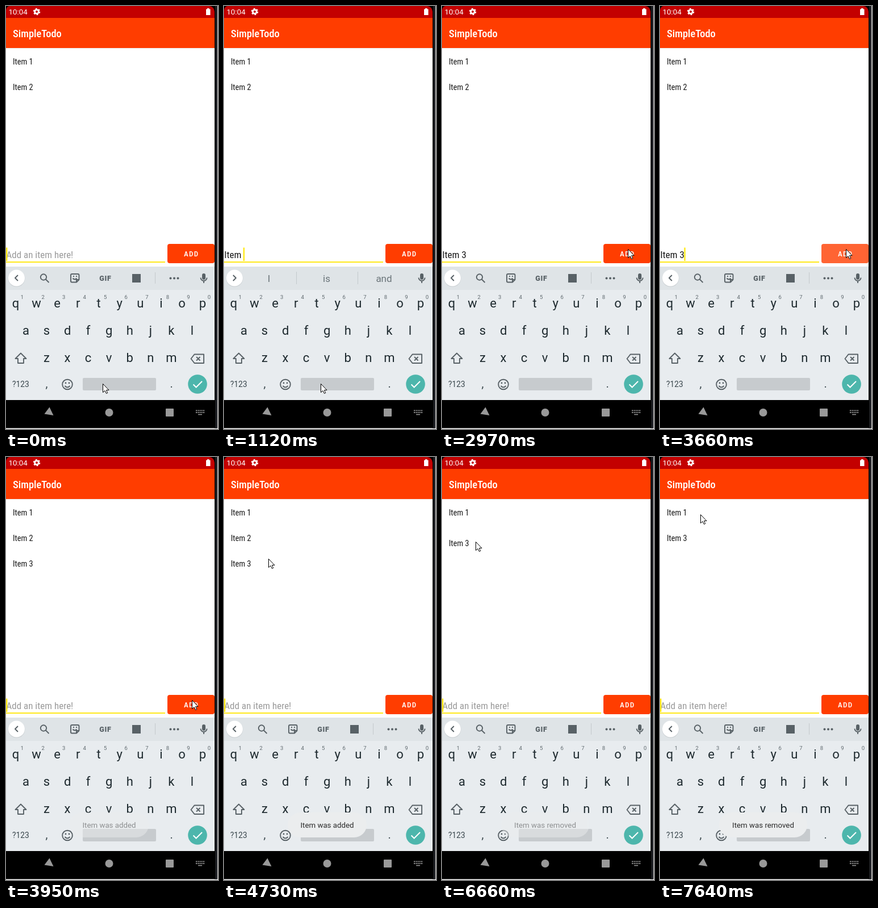
These frames come from a looping animation (373x745 px, 8 s). An HTML page:

```html
<!DOCTYPE html>
<html lang="en">
<head>
<meta charset="utf-8">
<title>Todo list demo</title>
<style>
html, body { margin: 0; width: 100%; height: 100%; overflow: hidden; background: #fff; }
svg { display: block; width: 100vw; height: 100vh; font-family: Roboto, sans-serif; }
.app { font-family: "Roboto Condensed", Roboto, sans-serif; font-stretch: condensed; }
.mid { text-anchor: middle; }
.line { fill: none; stroke: #586166; stroke-width: 1.9; stroke-linejoin: round; }
</style>
</head>
<body>
<svg viewBox="0 0 373 745">
  <rect width="373" height="745" fill="#fff"/>

  <!-- app -->
  <rect width="367" height="22" fill="#c30000"/>
  <rect y="21" width="367" height="53" fill="#ff3d00"/>
  <path d="M0 74.5H367" stroke="#ececec"/>
  <g fill="#fff">
    <text x="4.5" y="15" font-size="13.3">10:04</text>
    <circle cx="54" cy="10" r="3.4" fill="none" stroke="#fff" stroke-width="2.8"/>
    <circle cx="54" cy="10" r="5.3" fill="none" stroke="#fff" stroke-width="1.9" stroke-dasharray="2.8 2.75"/>
    <path d="M352 5.5h2V4h3.500v1.500h2V16h-7.500z"/>
    <text class="app" x="12" y="55" font-size="18.400" font-weight="500">SimpleTodo</text>
  </g>
  <g class="app" font-size="14.300" fill="#161616">
    <text x="12" y="102.500">Item 1</text>
    <text x="12" y="147.500" id="item2">Item 2</text>
    <text x="12" id="item3">Item 3</text>
  </g>
  <text class="app" id="field" x="0.500" y="443.500" font-size="17"/>
  <rect id="caret" y="425.500" width="2.500" height="23.500" fill="#ffeb1e"/>
  <rect y="450" width="280" height="2" fill="#ffe91a"/>
  <rect x="284" y="419" width="83" height="34" rx="4" fill="#ff3d00"/>
  <rect id="press" x="284" y="419" width="83" height="34" rx="4" fill="#fff"/>
  <text class="app" x="313" y="441" font-size="13" font-weight="500" letter-spacing="1.400" fill="#fff">ADD</text>

  <!-- keyboard -->
  <rect y="459" width="367" height="41" fill="#dfe4e7"/>
  <rect y="500" width="367" height="194" fill="#e8ecef"/>
  <circle cx="18.500" cy="479.800" r="14.800" fill="#c9ced1"/>
  <circle cx="18.500" cy="479" r="14.500" fill="#fff"/>
  <path id="chevron" class="line"/>
  <g id="tools" class="line">
    <circle cx="66" cy="477.500" r="5.200"/>
    <path d="M70 481.500l5.500 5.500M124 486.500H116a2 2 0 0 1-2-2V474a2 2 0 0 1 2-2h10.500a2 2 0 0 1 2 2v8zM124 486.500v-4.500h4.500M117.500 479.500q3.500 4 7 0"/>
    <path d="M118 476h2M123 476h2"/>
    <path d="M262.500 469v20" stroke="#c3c9cc" stroke-width="1"/>
    <g fill="#586166" stroke="none">
      <text class="mid" x="175" y="483.500" font-size="12.500" font-weight="900" letter-spacing=".8">GIF</text>
      <rect x="222" y="472" width="15" height="15"/>
      <circle cx="289.500" cy="479.500" r="2"/><circle cx="296" cy="479.500" r="2"/><circle cx="302.500" cy="479.500" r="2"/>
    </g>
  </g>
  <g id="hints" class="mid" font-size="17" fill="#6a7479">
    <path d="M127.500 468v22M235.500 468v22" stroke="#c3c9cc"/>
    <text x="79" y="486"/><text x="180.500" y="486"/><text x="281.500" y="486"/>
  </g>
  <rect x="345" y="471" width="6" height="11" rx="3" fill="#586166"/>
  <path class="line" d="M342.500 478.500a5.500 5.500 0 0 0 11 0M348 484v4"/>

  <g id="keys" class="mid" font-size="22" fill="#1d292e"></g>
  <g class="line">
    <path d="M26 611.500l9.500 9.500H31v8H21v-8h-4.500z"/>
    <path d="M331.500 613.500H348v15.500H331.500l-6-7.750zM335 618l6.500 6.500M341.500 618l-6.500 6.500"/>
    <circle cx="108" cy="666.500" r="8.800"/>
    <path d="M103.500 669q4.500 5 9 0"/>
  </g>
  <g fill="#586166"><circle cx="105" cy="664" r="1.400"/><circle cx="111" cy="664" r="1.400"/></g>
  <g fill="#38454b">
    <text x="11" y="671" font-size="13.800">?123</text>
    <text x="69.500" y="672" font-size="20">,</text>
    <text x="288.500" y="672" font-size="20">.</text>
  </g>
  <rect x="135" y="655" width="129" height="22" rx="2" fill="#c7cbce"/>
  <circle cx="337" cy="666" r="16.800" fill="#4db6ac"/>
  <path d="M329.500 666.500l5 5L345 661" fill="none" stroke="#fff" stroke-width="2"/>

  <g id="toast">
    <rect y="626" height="44" rx="22" fill="#ebedee"/>
    <text class="mid" x="181.500" y="653" font-size="13.300" fill="#2b2b2b"/>
  </g>

  <!-- navigation bar and bezel -->
  <rect y="694" width="372" height="49.500"/>
  <g fill="#999">
    <path d="M67.500 718.500L76.500 706.500L83.500 721z"/>
    <circle cx="181.500" cy="716" r="7"/>
    <rect x="281" y="709" width="14" height="14" rx="1"/>
    <path d="M334 712.500h15M334 716h15" stroke="#999" stroke-width="2" stroke-dasharray="2 1.250"/>
    <path d="M338 719.500h7" stroke="#999" stroke-width="1.500"/>
  </g>
  <rect x="367" width="5" height="743.500"/>
  <rect x="369" width="1.500" height="743.500" fill="#3c3f48"/>
  <path d="M0 0H6Q1 1 0 7zM367 0H358Q366 1 367 10z"/>

  <path id="pointer" d="M.5.500V15.500L4 12.500L6.500 17.500L8.700 16.500L6.500 11.500H11z" fill="#fff" stroke="#000"/>
</svg>
<script>
const LOOP = 8000;
const $ = id => document.getElementById(id);
const show = (id, opacity) => $(id).setAttribute('opacity', +opacity);

// The screen refreshes only at these moments.
const refreshes = [
  0, 270, 430, 700, 820, 1120, 1530, 1960, 2100, 2240, 2380, 2520, 2660, 2970,
  3660, 3800, 3950, 4070, 4200, 4320, 4450, 4580, 4730, 4870, 5020, 5160,
  5710, 5960, 6100, 6500, 6660, 6790, 6930, 7070, 7210, 7350, 7490, 7640
];
// start, typed text, suggestions
const typing = [
  [0, ''],
  [270, 'I', ['I', "I'm", "I'll"]],
  [430, 'It', ['It', "It's", 'its']],
  [700, 'Ite', ['Ite', 'item', 'items']],
  [820, 'Item', ['items', 'Item', 'itemized']],
  [1120, 'Item ', ['I', 'is', 'and']],
  [1530, 'Item 3'],
  [3800, '']
];
const pointerX = [[1820, 170], [2380, 349], [2660, 327], [4070, 327], [4580, 85], [5160, 59], [6930, 59], [7490, 71]];
const pointerY = [[1820, 665], [2380, 362], [2660, 428], [4070, 428], [4580, 190], [5160, 149], [6930, 149], [7490, 101]];
const toastFade = [[3840, 0], [4070, 1], [5800, 1], [6100, 0], [6550, 0], [6780, 1]];

function track(keys, t) {
  const i = keys.findIndex(key => key[0] > t);
  if (i < 0) return keys[keys.length - 1][1];
  if (i === 0) return keys[0][1];
  const [t0, a] = keys[i - 1], [t1, b] = keys[i];
  return a + (b - a) * (t - t0) / (t1 - t0);
}

function buildKeys() {
  const rows = [['qwertyuiop', 17, 531], ['asdfghjkl', 35, 578.5], ['zxcvbnm', 71.500, 626.5]];
  let markup = '';
  rows.forEach(([letters, x0, y], row) => [...letters].forEach((letter, i) => {
    const x = x0 + 36.55 * i;
    markup += `<text x="${x}" y="${y}">${letter}</text>`;
    if (row === 0) markup += `<text x="${x + 11.5}" y="516" font-size="9.5" fill="#5f696e">${(i + 1) % 10}</text>`;
  }));
  $('keys').innerHTML = markup;
}

function drawField(t) {
  const [, text, hints] = typing.filter(entry => entry[0] <= t).pop();
  const field = $('field');
  field.textContent = text.trim() || 'Add an item here!';
  field.setAttribute('fill', text ? '#161616' : '#9a9a9a');

  const spaceWidth = text.endsWith(' ') ? 3.7 : 0;
  const caretX = text ? field.getComputedTextLength() + spaceWidth : 0;
  $('caret').setAttribute('x', caretX);
  const blink = (t - (t < 3600 ? 460 : 590)) % 1000 < 500;
  show('caret', t < 1960 || blink);

  show('tools', !hints);
  show('hints', !!hints);
  $('hints').querySelectorAll('text').forEach((el, i) => el.textContent = hints ? hints[i] : '');
  $('chevron').setAttribute('d', hints ? 'M16 474l5 5l-5 5' : 'M21 474l-5 5l5 5');
}

function drawList(t) {
  const p = Math.min(1, Math.max(0, (t - 6484) / 250));
  const rise = 45 * (1 - Math.cos(Math.PI * p)) / 2;
  $('item3').setAttribute('y', 192.5 - rise);
  show('item3', track([[3700, 0], [3900, 1]], t));
  show('item2', t < 6500);
}

function drawToast(t) {
  const [box, label] = $('toast').children;
  const halfWidth = t < 6300 ? 69.5 : 77.5;
  box.setAttribute('x', 181.5 - halfWidth);
  box.setAttribute('width', 2 * halfWidth);
  label.textContent = t < 6300 ? 'Item was added' : 'Item was removed';
  show('toast', track(toastFade, t));
}

function draw(now) {
  const time = now % LOOP;
  const t = refreshes.filter(moment => moment <= time).pop();
  drawField(t);
  drawList(t);
  drawToast(t);
  show('press', t >= 3660 && t < 3950 ? track([[3660, .2], [3950, 0]], t) : 0);
  $('pointer').setAttribute('transform', `translate(${Math.round(track(pointerX, t))} ${Math.round(track(pointerY, t))})`);
  requestAnimationFrame(draw);
}

buildKeys();
requestAnimationFrame(draw);
</script>
</body>
</html>
```
